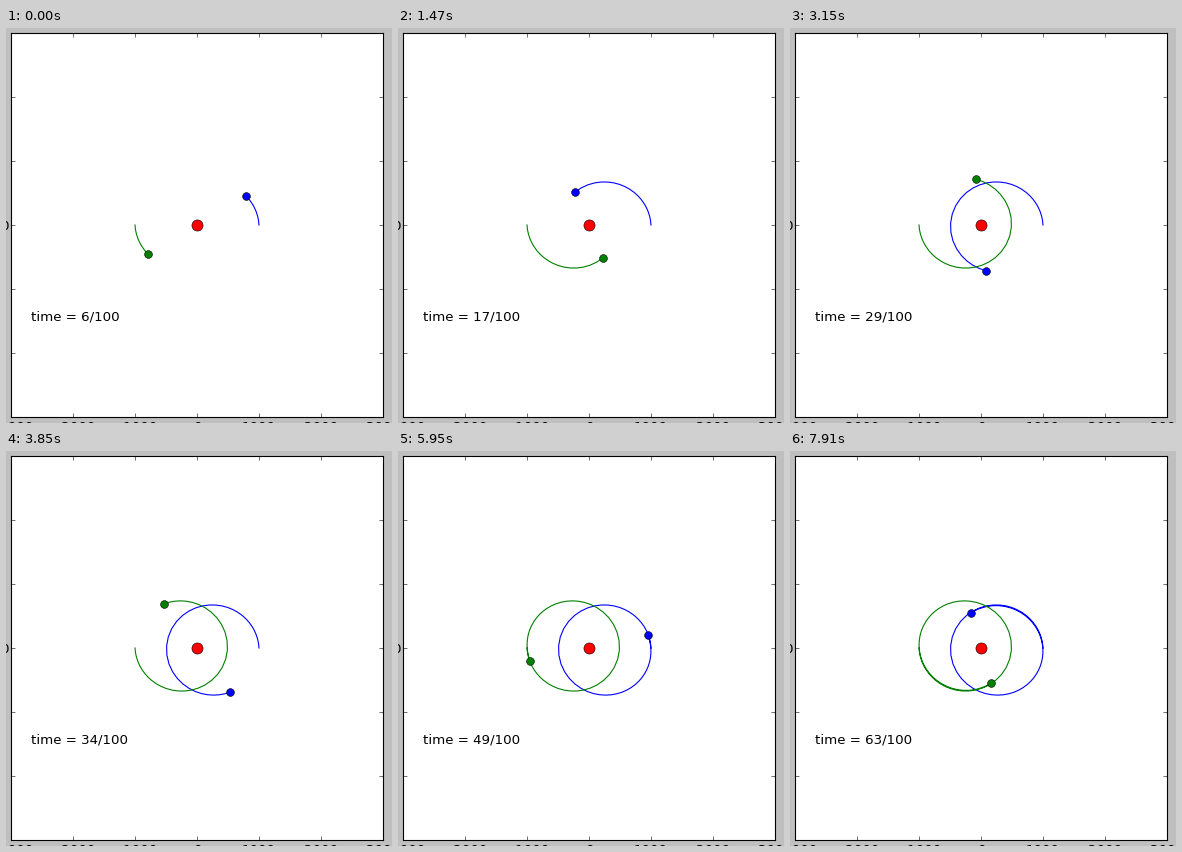
These frames come from a looping animation (386x395 px, 8 s). A matplotlib script:

```python
import numpy as np
import matplotlib.pyplot as plt
from matplotlib.animation import FuncAnimation

W, H, DPI = 386, 395, 80
LOOP, STEP = 8000, 20          # ms
R0, V0, GM = 1000, 70, 7.5e6   # start radius, start speed, pull
FIRST, LAST, HOLD = 6, 63, 140


def orbit(steps):
    """Semi-implicit Euler path around a fixed centre."""
    pos, vel = np.array([R0, 0.0]), np.array([0.0, V0])
    path = [pos]
    for _ in range(steps):
        vel = vel - GM * pos / np.hypot(*pos) ** 3
        pos = pos + vel
        path.append(pos)
    return np.array(path)


path = orbit(LAST + 1)

fig = plt.figure(figsize=(W / DPI, H / DPI), dpi=DPI, facecolor="0.75")
ax = fig.add_axes([5 / W, 6 / H, 372 / W, 384 / H])
ax.set_xlim(-3000, 3000)
ax.set_ylim(-3000, 3000)

ticks = np.arange(-3000, 3001, 1000)
ax.set_xticks(ticks)
ax.set_yticks(ticks, ["0" if t == 0 else "" for t in ticks])
ax.tick_params(direction="in", length=4, width=0.5, pad=4, labelsize=12,
               top=True, right=True)
ax.tick_params(axis="y", pad=2)
for spine in ax.spines.values():
    spine.set_linewidth(1)


def body(color, size):
    return ax.plot([0], [0], "o", color=color, ms=size,
                   mec="black", mew=0.5, zorder=4)[0]


bodies = []
for color, sign in (("#0000ff", 1), ("#008000", -1)):
    trail, = ax.plot([], [], color=color, lw=1)
    bodies.append((sign, trail, body(color, 7)))
body("#ff0000", 10)
label = ax.text(20 / 372, 0.25, "", transform=ax.transAxes, fontsize=12)


def update(i):
    t = i * STEP + STEP / 2
    n = min(FIRST + int((t + HOLD / 2) // HOLD), LAST)
    for sign, trail, dot in bodies:
        x, y = sign * path[:n + 2].T
        trail.set_data(x, y)
        dot.set_data(x[-1:], y[-1:])
    label.set_text(f"time = {n}/100")


anim = FuncAnimation(fig, update, frames=LOOP // STEP, interval=STEP,
                     init_func=lambda: update(0), repeat=True, repeat_delay=0)
plt.show()
```
